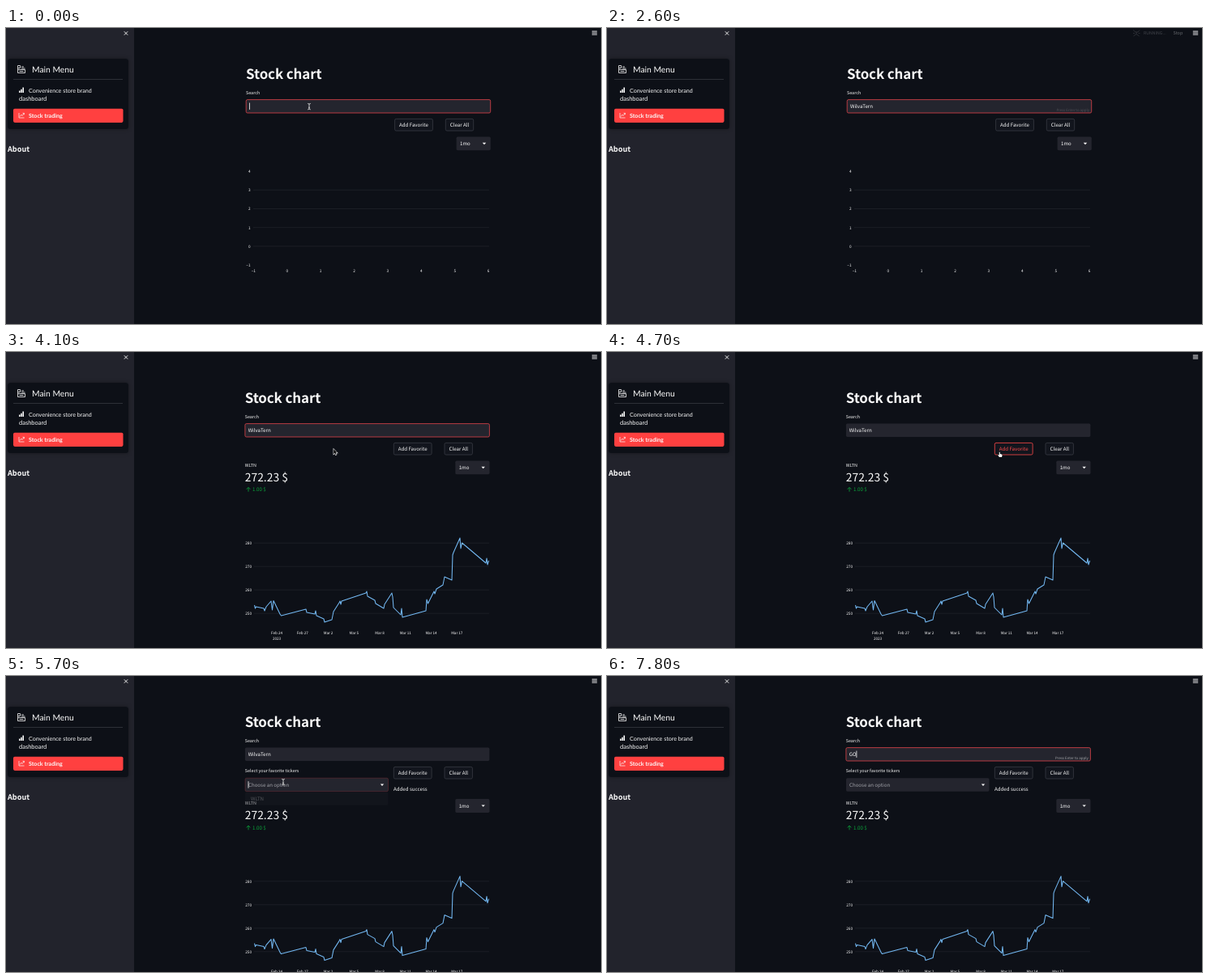
Write an HTML page with a canvas that moves like this. It is 734 by 366 pixels and loops after 8000 ms.

```html
<!DOCTYPE html>
<html lang="en">
<head>
<meta charset="utf-8">
<title>Stock chart</title>
<style>
html, body { margin: 0; width: 100%; height: 100%; overflow: hidden; background: #0d1017; }
canvas { display: block; width: 734px; height: 366px; }
</style>
</head>
<body>
<canvas id="stage"></canvas>
<script>
const LOOP = 8000, STEP = 100;
const UI = '"Noto Sans CJK JP", "Noto Sans CJK SC", "Noto Sans CJK", "Noto Sans", sans-serif';
const MENU = 'Lato, sans-serif';
const BG = '#0d1017', PANEL = '#24252e', RED = '#ff4b4b', WHITE = '#fafafa', GRID = '#22252c';
const COMPANY = 'WilvaTern', TICKER = 'WLTN';

// Typed text: [time, length]
const TYPING = [[0, 0], [400, 1], [600, 2], [800, 3], [1200, 5], [1700, 6], [1900, 7], [2000, 8], [2300, 9]];
// Pointer path: [time, x, y]
const POINTER = [[0, 374, 97], [2800, 374, 98], [3100, 378, 109], [3300, 378, 109], [3800, 383, 122],
  [4000, 384, 122], [4500, 485, 127], [4800, 485, 127], [5000, 352, 112], [5200, 351, 113],
  [5500, 342, 131], [6000, 342, 131], [6600, 367, 91], [6800, 312, 97]];
const PRICES = [306.5, 313, 307.5, 317, 308.5, 315, 318, 317, 319, 320, 321, 315, 327, 308, 328.5, 319, 330, 307.5,
  338, 324, 339.5, 326, 370, 318, 371, 322, 381, 324, 382, 320, 383, 326, 392, 330, 393, 334, 402, 331, 404, 321,
  411, 310, 412, 308, 413, 312, 414, 308, 444, 298, 445, 296, 446, 302, 455, 307, 456, 311, 466, 317, 467, 312,
  476, 298, 477, 303, 478, 316, 487, 325, 488, 317, 489, 328, 518, 320, 519, 306, 520.5, 311, 528, 296, 529, 299,
  531, 293, 539, 288, 541, 278, 550, 282, 551, 251, 552, 248, 560, 230, 561, 243, 562.5, 236, 592, 261, 593, 255,
  594, 263, 595.5, 258];

const canvas = document.getElementById('stage');
const ctx = canvas.getContext('2d');
const dpr = window.devicePixelRatio || 1;
canvas.width = 734 * dpr;
canvas.height = 366 * dpr;

function text(str, x, y, size, { color = WHITE, weight = 400, align = 'left', family = UI, spacing = 0 } = {}) {
  ctx.font = `${weight} ${size}px ${family}`;
  ctx.textRendering = 'geometricPrecision';
  ctx.letterSpacing = spacing + 'px';
  ctx.textAlign = align;
  ctx.fillStyle = color;
  ctx.fillText(str, x, y);
  return ctx.measureText(str).width;
}

function box(x, y, w, h, fill, border, radius = 1.7) {
  ctx.beginPath();
  ctx.roundRect(x, y, w, h, radius);
  if (fill) { ctx.fillStyle = fill; ctx.fill(); }
  if (border) { ctx.strokeStyle = border; ctx.lineWidth = 0.8; ctx.stroke(); }
}

function stroke(d, color, width = 0.8) {
  ctx.strokeStyle = color;
  ctx.lineWidth = width;
  ctx.stroke(new Path2D(d));
}

function fillPath(d, color) {
  ctx.fillStyle = color;
  ctx.fill(new Path2D(d));
}

function at(x, y, draw) {
  ctx.save();
  ctx.translate(x, y);
  draw();
  ctx.restore();
}

function faded(alpha, draw) {
  if (alpha <= 0) return;
  ctx.save();
  ctx.globalAlpha = Math.min(1, alpha);
  draw();
  ctx.restore();
}

const chevron = (x, y) => fillPath(`M${x - 2.2} ${y - 1}h4.4l-2.2 2.4z`, WHITE);

function sidebar() {
  ctx.fillStyle = '#22232c';
  ctx.fillRect(0, 0, 158, 366);
  stroke('M145.8 4.3l4.4 4.4m0-4.4l-4.4 4.4', WHITE, 0.9);

  ctx.save();
  ctx.shadowColor = 'rgba(0,0,0,.35)';
  ctx.shadowBlur = 5 * dpr;
  box(2, 38, 149, 87, BG, null, 3.5);
  ctx.restore();
  stroke('M14.5 46.5h3v3h-3zM14.5 51.5h9v4h-9zM14.5 51.5v-2M19 48h3M19 50h4.5M16.5 53.5h5', WHITE, 0.8);
  text('Main Menu', 32, 55, 10.3, { family: MENU });
  stroke('M9 63.5H144', '#3c3e45', 0.7);

  fillPath('M16 77.5h1.6v2.5H16zM18.2 75.7h1.6V80h-1.6zM20.4 73.6H22V80h-1.6z', WHITE);
  text('Convenience store brand', 28, 79.7, 7.1, { family: MENU });
  text('dashboard', 16, 90, 7.5, { family: MENU });

  box(9, 99.7, 135.5, 17.2, '#ff4040', null, 1.8);
  stroke('M16 105v6h6.5M17 109.5l1.8-2.3 1.4 1.2 2-3M20.5 105.3h1.9v1.9', WHITE, 0.7);
  text('Stock trading', 28, 110.7, 7.1, { family: MENU, weight: 700 });
  text('About', 2, 153.4, 9.1, { weight: 700 });
}

function toolbar(running) {
  stroke('M722.8 4.1h6.4M722.8 6.1h6.4M722.8 8.1h6.4', WHITE, 0.9);
  faded(running, () => {
    stroke('M649 2.5l3 2.5h3l2-2.5M653 5v2.5l-3.5 2.5M653 7.5l3.5 2.5M649 6.5h2M655.5 6.5h2', '#62656c', 0.7);
    text('RUNNING...', 662, 8.1, 5.2, { color: '#777a80' });
    text('Stop', 698.5, 8.1, 5.5, { color: '#b9bbc0' });
  });
}

function button(label, x, w, hover) {
  box(x, 112.4, w, 14.6, '#12151d', hover ? RED : '#393c44');
  text(label, x + w / 2, 122, 6.15, { align: 'center', color: hover ? RED : WHITE });
}

function caret(x, y) {
  ctx.fillStyle = WHITE;
  ctx.fillRect(x, y, 0.8, 8.4);
}

function searchField({ value, focus, caretOn, selected, hint }) {
  text('Search', 296, 81.7, 5.4);
  box(296.2, 88.6, 301.5, 16.4, PANEL, focus ? '#e0434a' : null);
  if (selected) {
    ctx.fillStyle = '#3d5f8a';
    ctx.fillRect(300, 92.4, 28.7, 9.2);
  }
  const width = text(value, 300, 99.2, 6.15);
  if (caretOn) caret(300 + width, 92.5);
  faded(hint, () => text('Press Enter to apply', 595, 103, 4.4, { align: 'right', color: '#a5a7ac' }));
}

function emptyChart() {
  for (let i = -1; i <= 4; i++) {
    const y = 269.9 - i * 23.2;
    if (i > -1 && i < 4) stroke(`M305 ${y}H596`, GRID, 0.7);
    text(String(i).replace('-', '−'), 301.5, y + 1.8, 4.7, { align: 'right' });
  }
  for (let i = -1; i <= 6; i++)
    text(String(i).replace('-', '−'), 346.7 + i * 41.4, 302, 4.7, { align: 'center' });
}

function priceChart() {
  for (let i = 0; i < 4; i++) {
    const y = 323.2 - i * 29;
    stroke(`M306 ${y}H596`, GRID, 0.7);
    text(String(250 + i * 10), 303, y + 1.8, 4.7, { align: 'right' });
  }
  ['Feb 24', 'Feb 27', 'Mar 2', 'Mar 5', 'Mar 8', 'Mar 11', 'Mar 14', 'Mar 17']
    .forEach((day, i) => text(day, 334 + i * 31.75, 348.9, 4.6, { align: 'center' }));
  text('2023', 334, 355.7, 4.6, { align: 'center' });
  ctx.lineJoin = 'round';
  stroke('M' + PRICES.join(' '), '#73b8f2', 1.05);
}

function metric() {
  text(TICKER, 294.8, 141.6, 5.4);
  text('272.23 $', 294.8, 159.6, 13.85);
  stroke('M299 172.7v-5M296.6 169.8l2.4-2.4 2.4 2.4', '#0ba53b', 0.8);
  text('1.00 $', 304, 172.2, 6.15, { color: '#0ba53b' });
}

function favorites(open) {
  text('Select your favorite tickers', 294.8, 119.4, 5.4);
  box(295, 126.2, 176.5, 16.5, PANEL);
  faded(open, () => box(295, 126.2, 176.5, 16.5, null, '#a63a41'));
  text('Choose an option', 299, 136.8, 6.15, { color: '#a0a2a8' });
  chevron(464, 134.6);
  if (open > 0) caret(298.6, 130.2);
  text('Added success', 478, 141.8, 6.15);
}

function dropdown(open) {
  faded(open, () => {
    box(295, 143.4, 176.5, 16.4, '#1b1d25');
    text(TICKER, 302, 154, 6.15, { color: '#b8babf' });
  });
}

function pointerAt(t) {
  let i = POINTER.length - 1;
  while (i && POINTER[i][0] > t) i--;
  const [t0, x0, y0] = POINTER[i];
  const [t1, x1, y1] = POINTER[i + 1] || [t0 + 1, x0, y0];
  const k = Math.min(1, (t - t0) / (t1 - t0));
  return { x: x0 + (x1 - x0) * k, y: y0 + (y1 - y0) * k };
}

function drawPointer({ x, y }, kind) {
  at(x, y, () => {
    if (kind === 'text') {
      stroke('M-1.8-3.6Q0-3.6 0-2.4Q0-3.6 1.8-3.6M0-2.6V2.8M-1.8 3.8Q0 3.8 0 2.6Q0 3.8 1.8 3.8M-.9 1.3h1.8', '#e8e8e8', 0.8);
    } else {
      const shape = kind === 'hand'
        ? 'M-1.3-3.3q.8-.6 1.1.2V-.9l2 .4q.9.2.8 1.1L2.1 3H-1.1L-3 .3q.3-.9 1.7.2z'
        : 'M0-3V3.3L1.5 2 2.5 4.2l1-.5-1-2.1h1.9z';
      stroke(shape, kind === 'hand' ? '#000' : '#fff', 1.1);
      fillPath(shape, kind === 'hand' ? '#fff' : '#101010');
    }
  });
}

const ramp = (t, from, to) => Math.max(0, Math.min(1, (t - from) / (to - from)));

function fieldState(t) {
  if (t < 2500) {
    const length = TYPING.filter(([time]) => time <= t).pop()[1];
    return { value: COMPANY.slice(0, length), focus: true, caretOn: t < 100 || t >= 400, hint: ramp(t, 300, 600) };
  }
  if (t < 7000) {
    return { value: COMPANY, focus: t < 4600 || t >= 6700, selected: t >= 6800, hint: 1 - ramp(t, 2400, 2700) };
  }
  return { value: t < 7700 ? '' : t < 7800 ? 'G' : 'GO', focus: true, caretOn: true, hint: ramp(t, 7600, 7800) };
}

function render(t) {
  const loaded = t >= 2800, added = t >= 4800;
  const open = t < 6000 ? ramp(t, 5600, 5800) * (t < 5800 ? 0.8 : 1) : 1 - ramp(t, 5900, 6200);
  const running = t < 4000 ? ramp(t, 2500, 2700) * (1 - ramp(t, 3100, 3300)) : added && t < 5000 ? 0.8 : 0;
  const pointer = pointerAt(t);
  const pointerOn = t < 400 || (loaded && t < 7000);
  const hover = pointerOn && pointer.x > 478 && pointer.x < 526 && pointer.y > 112;
  const overText = (pointer.y > 88 && pointer.y < 105.5) || (added && pointer.y > 126 && pointer.x < 471);

  ctx.setTransform(dpr, 0, 0, dpr, 0, 0);
  ctx.fillStyle = BG;
  ctx.fillRect(0, 0, 734, 366);
  sidebar();
  toolbar(running);

  // The page scrollbar narrows the column once results are in
  at(loaded ? -1.3 : 0, 0, () => {
    text('Stock chart', 296, 62.7, 16.9, { weight: 700, spacing: -0.09 });
    searchField(fieldState(t));
    button('Add Favorite', 479.6, 46.8, hover);
    button('Clear All', 542.3, 34.4, false);
  });

  if (added) favorites(open);
  at(0, added ? 17.6 : 0, () => {
    at(loaded ? -1.3 : 0, 0, () => {
      box(555.6, 134.5, 42.2, 16.8, PANEL);
      text('1mo', 560, 145.2, 6.15);
      chevron(590, 142.8);
    });
    if (loaded) {
      metric();
      priceChart();
    } else {
      emptyChart();
    }
  });
  if (added) dropdown(open);
  if (pointerOn) drawPointer(pointer, hover ? 'hand' : overText ? 'text' : 'arrow');
}

function tick() {
  const t = performance.now() % LOOP;
  render(Math.floor(t / STEP) * STEP);
  requestAnimationFrame(tick);
}
tick();
</script>
</body>
</html>
```
